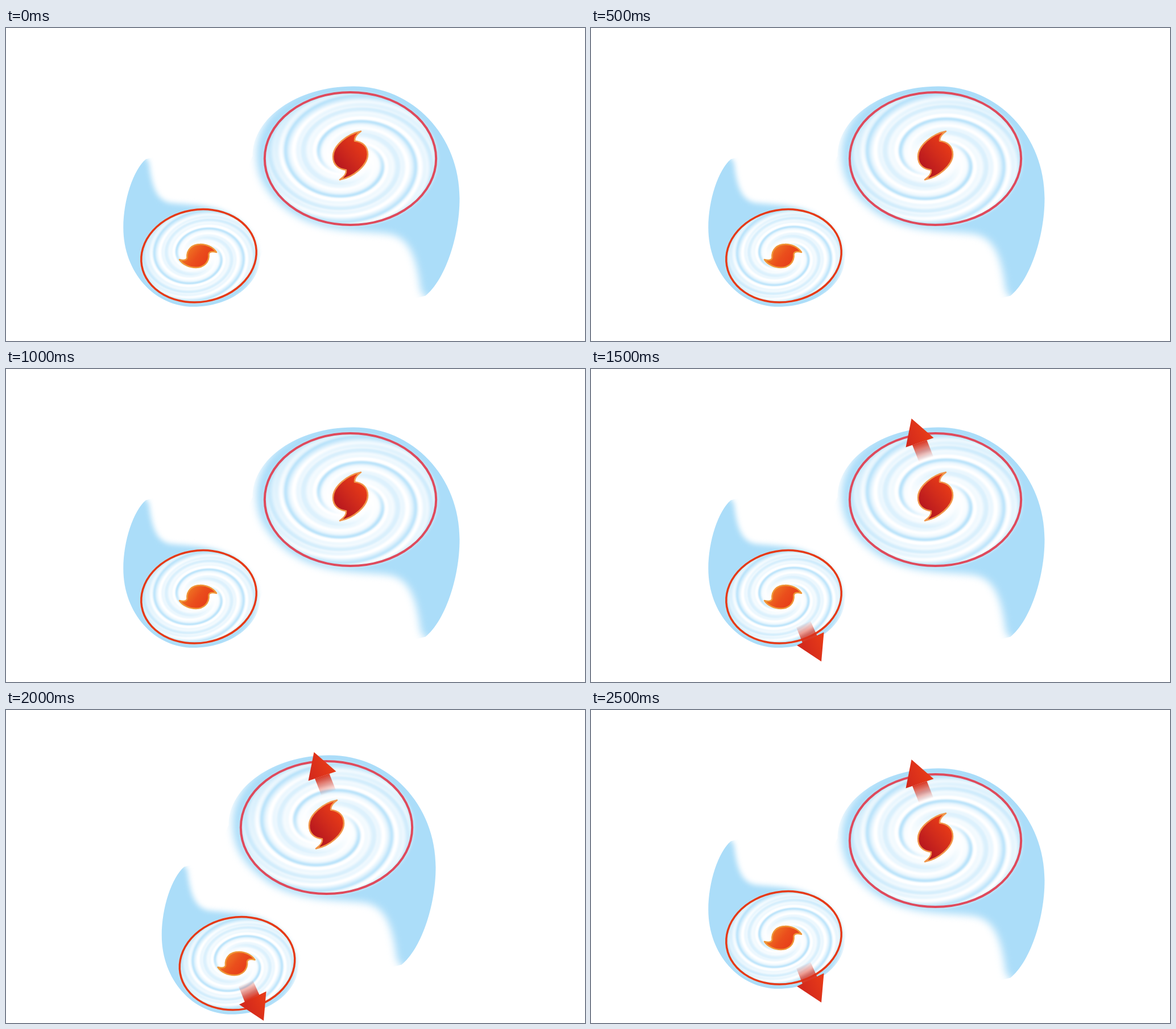
Animation, 1018 px wide and 550 px high, one loop 3000 ms. Source, as an HTML page with a canvas:

```html
<!DOCTYPE html>
<html lang="en">
<head>
<meta charset="utf-8">
<title>Two cyclones</title>
<style>
html, body { margin: 0; width: 100%; height: 100%; overflow: hidden; background: #fff; }
canvas { display: block; }
</style>
</head>
<body>
<canvas id="stage" width="1018" height="550"></canvas>
<script>
const ctx = document.getElementById('stage').getContext('2d');
const TAU = Math.PI * 2, BLUE = [169, 220, 249];
const smooth = (a, b, v) => {
  const t = Math.min(1, Math.max(0, (v - a) / (b - a)));
  return t * t * (3 - 2 * t);
};

// Cloud bands on a unit disc: everything follows one evenly wound spiral.
function makeBands(turn) {
  const size = 440, reach = 1.1;
  const c = document.createElement('canvas');
  c.width = c.height = size;
  const g = c.getContext('2d'), img = g.createImageData(size, size);
  for (let j = 0; j < size; j++) for (let i = 0; i < size; i++) {
    const x = (2 * i / size - 1) * reach, y = (2 * j / size - 1) * reach;
    const r = Math.hypot(x, y), a = Math.atan2(y, x);
    const p = a - turn - r / 0.125;
    const arm = p * 4 / TAU, d = arm - Math.round(arm);
    const main = Math.exp(-((d / (d < 0 ? 0.13 : 0.22)) ** 2));
    const soft = 0.5 + 0.5 * Math.sin(6 * p + 1);
    const wisps = Math.sin(10 * p + 4 * r);
    const vary = 0.85 + 0.15 * Math.cos(2 * p + 0.6);
    let b = smooth(0.2, 0.45, r) * (vary * 0.6 * main + 0.16 * soft + 0.06 * wisps);
    const rim = smooth(0.7, 1, r) * (0.2 - 0.15 * Math.sin(a + 0.6));
    b = Math.min(1, Math.max(0, b + rim * (1 - b)));
    const k = (j * size + i) * 4;
    BLUE.forEach((v, n) => img.data[k + n] = 255 + (v - 255) * b);
    img.data[k + 3] = 255 * (1 - smooth(0.94, 1.06, r));
  }
  g.putImageData(img, 0, 0);
  return c;
}
const bands = [makeBands(0.31), makeBands(0)];

const hull = new Path2D('M-172-5C-172-70-95-127 5-127C110-127 192-40 192 70C192 140 165 215 132 241L90 252L50 165L-140 165L-195 50Z');
const body = new Path2D('M-165-5C-166-80-95-135 5-142L212-142L217 240L150 262L124 234C116 172 104 138 66 132C20 126-55 131-108 92C-140 68-165 40-165-5Z');

function linear(x0, y0, x1, y1, ...stops) {
  const g = ctx.createLinearGradient(x0, y0, x1, y1);
  stops.forEach((s, i) => g.addColorStop(i / (stops.length - 1), s));
  return g;
}

const storms = [
  { x: 605.5, y: 229.5, dx: 0, sx: 1, sy: 1, rx: 150.7, ry: 116.6, tilt: 0,
    ring: '#df4a5c', line: 4, move: [-42, -23], arrowMove: [-22, -13],
    eye: new Path2D('M624 181.5C600 186 575 207 575 226C575 240 584 248 598 249.5C599 256 595 261 587 266.5C611 262 636 241 636 222C636 208 627 200 613 198.5C612 192 616 187 624 181.5Z'),
    fill: linear(580, 245, 630, 205, '#b5151f', '#cf2a1c', '#e83b17'), edge: '#f0964a',
    head: new Path2D('M563.5 87L602.5 121L553.5 137.5Z'),
    headFill: linear(556, 125, 590, 110, '#d42a1c', '#e63a18'),
    shaft: new Path2D('M565 133.5L590.5 125L602 154L577 164Z'),
    shaftFill: linear(578, 128, 589, 159, '#d9301bff', '#d9301b80', '#d9301b00') },
  { x: 339, y: 400.3, dx: -6, sx: -0.66, sy: -0.705, rx: 101.8, ry: 81, tilt: -0.171,
    ring: '#e63a17', line: 3.5, move: [67.5, 45], arrowMove: [48, 32],
    eye: new Path2D('M370 394C364 385 352 379.5 341 380C328 380 317 389 318.5 404C317 409 311 408.5 305 407C311 416 323 421 334 421C347 421 358 412 356.5 397C358 392 364 392.5 370 394Z'),
    fill: linear(318, 385, 356, 416, '#f07a24', '#ea4e1c', '#e63a18'), edge: '#ef9638',
    head: new Path2D('M405 514L362 485.5L409.5 462.5Z'),
    headFill: linear(378, 495, 409, 480, '#d42a1c', '#e63a18'),
    shaft: new Path2D('M372 481.5L397.5 468.5L386 443L361 454Z'),
    shaftFill: linear(385, 475, 373, 447, '#d9301bff', '#d9301b80', '#d9301b00') }
];

function drawStorm(s, texture, away) {
  ctx.save();
  if (away) ctx.translate(...s.move);

  ctx.save();
  ctx.translate(s.x, s.y);
  ctx.save();
  ctx.translate(s.dx, 0);
  ctx.scale(s.sx, s.sy);
  ctx.clip(hull);
  ctx.filter = `blur(${7 * Math.abs(s.sx)}px)`;
  ctx.fillStyle = '#abddf9';
  ctx.fill(body);
  ctx.restore();

  ctx.rotate(s.tilt);
  ctx.drawImage(texture, -1.1 * s.rx, -1.1 * s.ry, 2.2 * s.rx, 2.2 * s.ry);
  ctx.beginPath();
  ctx.ellipse(0, 0, s.rx, s.ry, 0, 0, TAU);
  ctx.lineWidth = s.line;
  ctx.strokeStyle = s.ring;
  ctx.stroke();
  ctx.restore();

  ctx.fillStyle = s.fill;
  ctx.fill(s.eye);
  ctx.lineWidth = 2.6;
  ctx.lineJoin = 'round';
  ctx.strokeStyle = s.edge;
  ctx.stroke(s.eye);
  ctx.restore();
}

function drawArrow(s, away) {
  ctx.save();
  if (away) ctx.translate(...s.arrowMove);
  ctx.fillStyle = s.shaftFill;
  ctx.fill(s.shaft);
  ctx.fillStyle = s.headFill;
  ctx.fill(s.head);
  ctx.restore();
}

let shown = -1;
function tick() {
  const step = Math.floor(performance.now() % 3000 / 500);
  if (step !== shown) {
    shown = step;
    const away = step === 4;
    ctx.fillStyle = '#fff';
    ctx.fillRect(0, 0, 1018, 550);
    storms.forEach(s => drawStorm(s, bands[step % 2], away));
    if (step > 2) storms.forEach(s => drawArrow(s, away));
  }
  requestAnimationFrame(tick);
}
tick();
</script>
</body>
</html>
```
